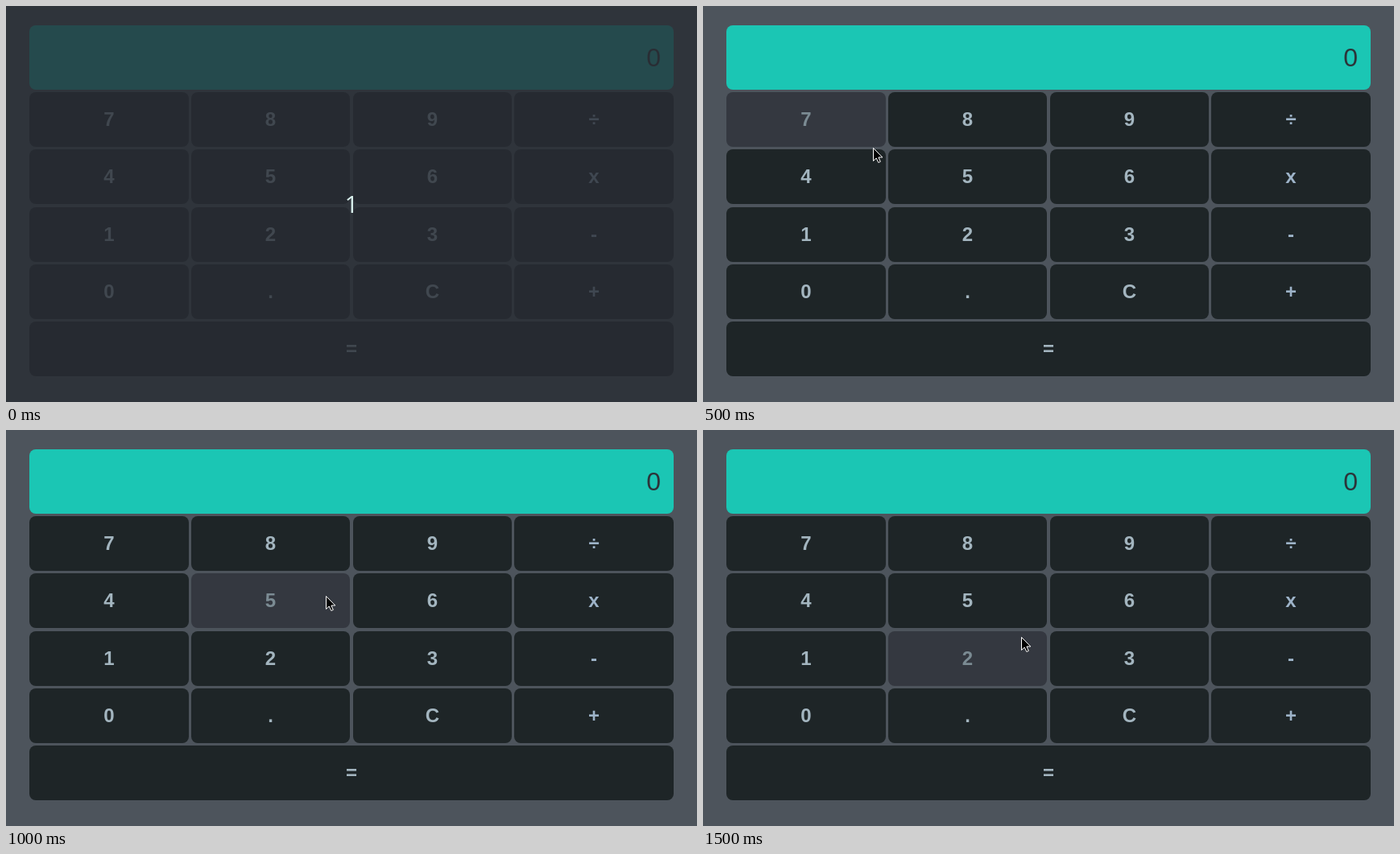
An HTML page for the animation above (8 s loop, 858 by 492 pixels).

```html
<!DOCTYPE html>
<html lang="en">
<head>
<meta charset="utf-8">
<title>Calculator</title>
<style>
  html, body { margin: 0; width: 100%; height: 100%; overflow: hidden; background: #4d545c; }
  svg { display: block; width: 858px; height: 492px; }
  text { font-family: "Liberation Sans", Arial, sans-serif; }
  .key text { font-size: 24px; font-weight: 700; text-anchor: middle; fill: #a3b5bf; }
  .key.op text { fill: #9db3c8; }
  .key rect { fill: #1e2527; }
  .key.hover rect { fill: #343840; }
  .key.hover text { fill: #7b8b93; }
  #count { font: 30px "Open Sans", "Noto Sans", sans-serif; text-anchor: middle; fill: #d8efec; }
</style>
</head>
<body>
<svg viewBox="0 0 858 492">
  <rect width="858" height="492" fill="#4d545c"/>
  <rect x="29" y="24" width="800" height="80" rx="8" fill="#1bc6b4"/>
  <text x="813" y="75" font-size="32" text-anchor="end" fill="#2c3439">0</text>
  <g id="keys"></g>
  <g id="veil">
    <rect width="858" height="492" fill="#282c34" fill-opacity=".8"/>
    <text id="count" x="429" y="257">1</text>
  </g>
  <path id="cursor" d="M.5 .5V16.5L4.2 13L6.8 18.5L9.3 17.4L6.9 12H11.8Z" fill="#000" stroke="#fff"/>
</svg>
<script>
const LOOP = 8000, STEP = 100, VEIL_END = 100, ENTER = 300;
const NS = "http://www.w3.org/2000/svg";
const byId = id => document.getElementById(id);
const keysEl = byId("keys"), veil = byId("veil"), cursor = byId("cursor");

function add(parent, tag, attrs, text) {
  const el = document.createElementNS(NS, tag);
  for (const name in attrs) el.setAttribute(name, attrs[name]);
  if (text) el.textContent = text;
  return parent.appendChild(el);
}

const keys = {};
function addKey(label, x, right, y) {
  const g = add(keysEl, "g", { class: "÷x-+".includes(label) ? "key op" : "key" });
  add(g, "rect", { x, y, width: right - x, height: 68, rx: 8 });
  add(g, "text", { x: (x + right) / 2, y: y + 42 }, label);
  keys[label] = g;
}

const cols = [[29, 227], [230, 427], [431, 628], [631, 829]];
const rows = [107, 178, 250, 321];
["789÷", "456x", "123-", "0.C+"].forEach((line, r) =>
  [...line].forEach((label, c) => addKey(label, ...cols[c], rows[r])));
addKey("=", 29, 829, 392);

// Pointer tip on each step after it enters
const path = [
  [112, 4], [164, 110], [211, 176], [265, 202], [310, 211], [347, 211], [376, 208],
  [397, 206], [406, 212], [409, 221], [408, 230], [404, 244], [395, 257]
];

function hovered(step) {
  if (step < 1) return "";
  if (step < 3) return "7";
  return step < 12 ? "5" : "2";
}

function draw(t) {
  const step = Math.min(Math.floor((t - ENTER) / STEP), path.length - 1);
  veil.style.display = t < VEIL_END ? "" : "none";
  cursor.style.display = step < 0 ? "none" : "";
  if (step >= 0) cursor.setAttribute("transform", `translate(${path[step]})`);
  const active = hovered(step);
  for (const label in keys) keys[label].classList.toggle("hover", label === active);
}

function tick() {
  draw(performance.now() % LOOP);
  requestAnimationFrame(tick);
}
tick();
</script>
</body>
</html>
```
